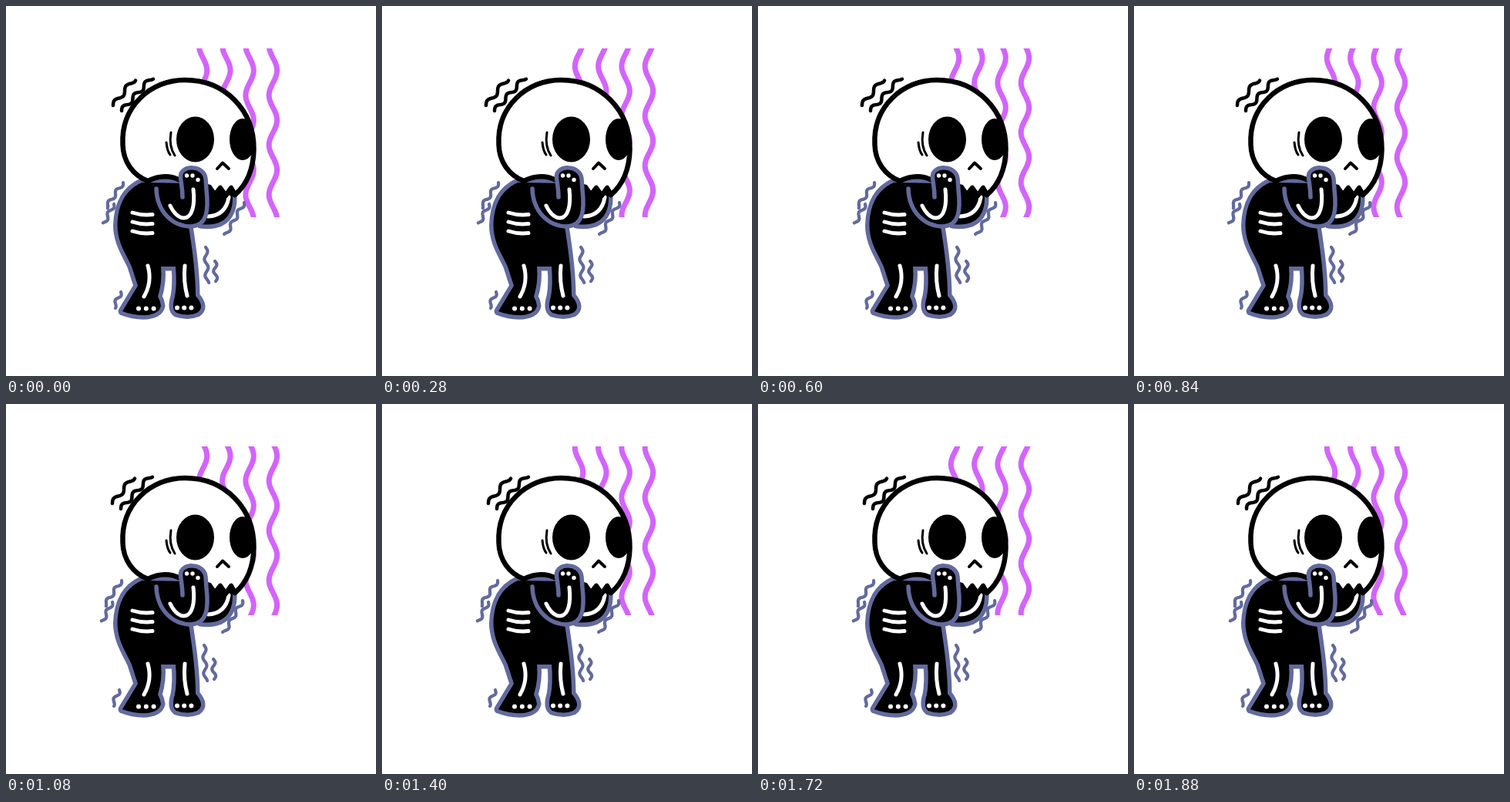
Recreate the animation shown at these times as an HTML page with a canvas. Size 480 by 480 pixels, loop 1920 ms.

```html
<!DOCTYPE html>
<html lang="en">
<head>
<meta charset="utf-8">
<title>Shivering skeleton</title>
<style>
html, body { margin: 0; width: 100%; height: 100%; overflow: hidden; background: #fff; }
canvas { display: block; width: 480px; height: 480px; }
</style>
</head>
<body>
<canvas id="stage" width="480" height="480"></canvas>
<script>
const ctx = document.getElementById('stage').getContext('2d');
const TAU = Math.PI * 2;
const BLUE = '#626a9d', BLACK = '#000', WHITE = '#fff', PURPLE = '#d463ff';
const LOOP = 1920, TICK = 40, FLOW = 480, SHAKE = 80, WAVE = 64.5;

const head = new Path2D('M151.500 180C149 130 188 96 232 96C285 96 322 136 321.500 186C321 212 312 232 297 245L292 236L285 246L278 236L271 245L264 235L226 226Q206 216 184 227C165 220 152 202 151.500 180Z');
const torso = new Path2D('M176 229C150 241 145 265 144.500 285C145 308 156 322 163 338L171 363L151 396Q166 402 183 401Q199 399 201 389Q200 382 197 377Q203 358 201 338H220Q222 362 219 377Q214 393 221 398Q236 403 248 398Q259 391 246 376Q246 340 236 280V230Z');
const farArm = new Path2D('M258 238H293C297 262 290 288 252 283Z');
const nearArm = new Path2D('M195 237C196 268 217 286 240 286C261 285 263 265 260 238L259 224C257 205 225 206 226.500 222C227 230 229 236 229 248');

function line(path, color, width) {
  ctx.strokeStyle = color;
  ctx.lineWidth = width;
  ctx.stroke(path);
}

function fill(path, color) {
  ctx.fillStyle = color;
  ctx.fill(path);
}

function limb(path) {
  line(path, BLUE, 11);
  fill(path, BLACK);
}

function oval(x, y, rx, ry, color) {
  const p = new Path2D();
  p.ellipse(x, y, rx, ry, 0, 0, TAU);
  fill(p, color);
}

function toes(x, y, gap) {
  for (let i = 0; i < 3; i++) oval(x + i * gap, y, 3, 3, WHITE);
}

function squiggle(x0, y0, x1, y1, waves, amp, color, width) {
  const p = new Path2D();
  const dx = x1 - x0, dy = y1 - y0, len = Math.hypot(dx, dy);
  for (let u = 0; u <= 1; u += 1 / 32) {
    const off = amp * Math.sin(u * waves * TAU) / len;
    p.lineTo(x0 + dx * u + dy * off, y0 + dy * u - dx * off);
  }
  line(p, color, width);
}

function heat(time) {
  const crest = 83.5 - WAVE * time / FLOW;
  ctx.save();
  ctx.beginPath();
  ctx.rect(240, 55, 120, 219);
  ctx.clip();
  for (let i = 0; i < 4; i++) {
    const p = new Path2D(), x = 255.5 + 30.3 * i;
    const end = i < 2 ? 180 : 280;
    for (let y = 48; y <= end; y += 2) p.lineTo(x + 5.2 * Math.cos((y - crest) / WAVE * TAU), y);
    line(p, PURPLE, 7);
  }
  ctx.restore();
}

function shiver(time) {
  const angle = Math.floor(time / SHAKE) * TAU / 4;
  const c = Math.cos(angle), s = Math.sin(angle);
  const blue = (...a) => squiggle(...a, 2.3, BLUE, 4.2);

  ctx.save();
  ctx.translate(1.5 + 2.5 * c + 1.5 * s, 0);
  squiggle(135, 129, 162, 95, 1.8, 2.8, BLACK, 4.5);
  squiggle(146, 136, 185, 93, 2.7, 2.8, BLACK, 4.5);
  ctx.restore();

  ctx.save();
  ctx.translate(1.5 * c - .5 * s - .5, 0);
  blue(151, 229, 129, 261, 2.2);
  blue(139, 257, 126, 282, 1.6);
  blue(308, 255, 284, 297, 2.7);
  blue(258, 313, 260, 359, 2.2);
  blue(270, 331, 271, 357, 1.5);
  blue(148, 371, 139, 391, 1.3);
  ctx.restore();
}

function face() {
  fill(head, WHITE);
  ctx.save();
  ctx.clip(head);
  oval(245.5, 173, 24.5, 29.5, BLACK);
  oval(307, 173, 17, 27, BLACK);
  ctx.restore();
  line(head, BLACK, 6.5);
  line(new Path2D('M274 211L281 203.500L289 211'), BLACK, 4);
  line(new Path2D('M208 177Q209 188 213 193M214 164Q211 182 219 194'), BLACK, 3);
}

function bones() {
  for (let i = 0; i < 3; i++) {
    const y = 268 + 12 * i;
    line(new Path2D(`M164 ${y}Q176 ${y + 4} 190 ${y + 2.5}`), WHITE, 5);
  }
  line(new Path2D('M184 337Q190 358 179 377M232 337Q230 357 235 376'), WHITE, 5);
  line(new Path2D('M213 259C224 283 248 283 243 238'), WHITE, 5);
  toes(172, 392.5, 9.8);
  toes(222, 391.5, 9.2);
}

function skeleton() {
  limb(torso);
  limb(farArm);
  line(new Path2D('M262 273Q285 272 289 248'), WHITE, 5);
  face();
  fill(nearArm, BLACK);
  line(nearArm, BLUE, 5.5);
  bones();
  for (const [x, y] of [[234.5, 220], [242, 220], [249, 225.5]]) oval(x, y, 2.7, 2.7, WHITE);
}

function draw(time) {
  ctx.fillStyle = WHITE;
  ctx.fillRect(0, 0, 480, 480);
  ctx.lineJoin = 'round';
  ctx.lineCap = 'butt';
  heat(time);
  ctx.lineCap = 'round';
  shiver(time);
  skeleton();
}

const start = performance.now();
function frame() {
  const time = (performance.now() - start) % LOOP;
  draw(Math.floor(time / TICK) * TICK);
  requestAnimationFrame(frame);
}
frame();
</script>
</body>
</html>
```
